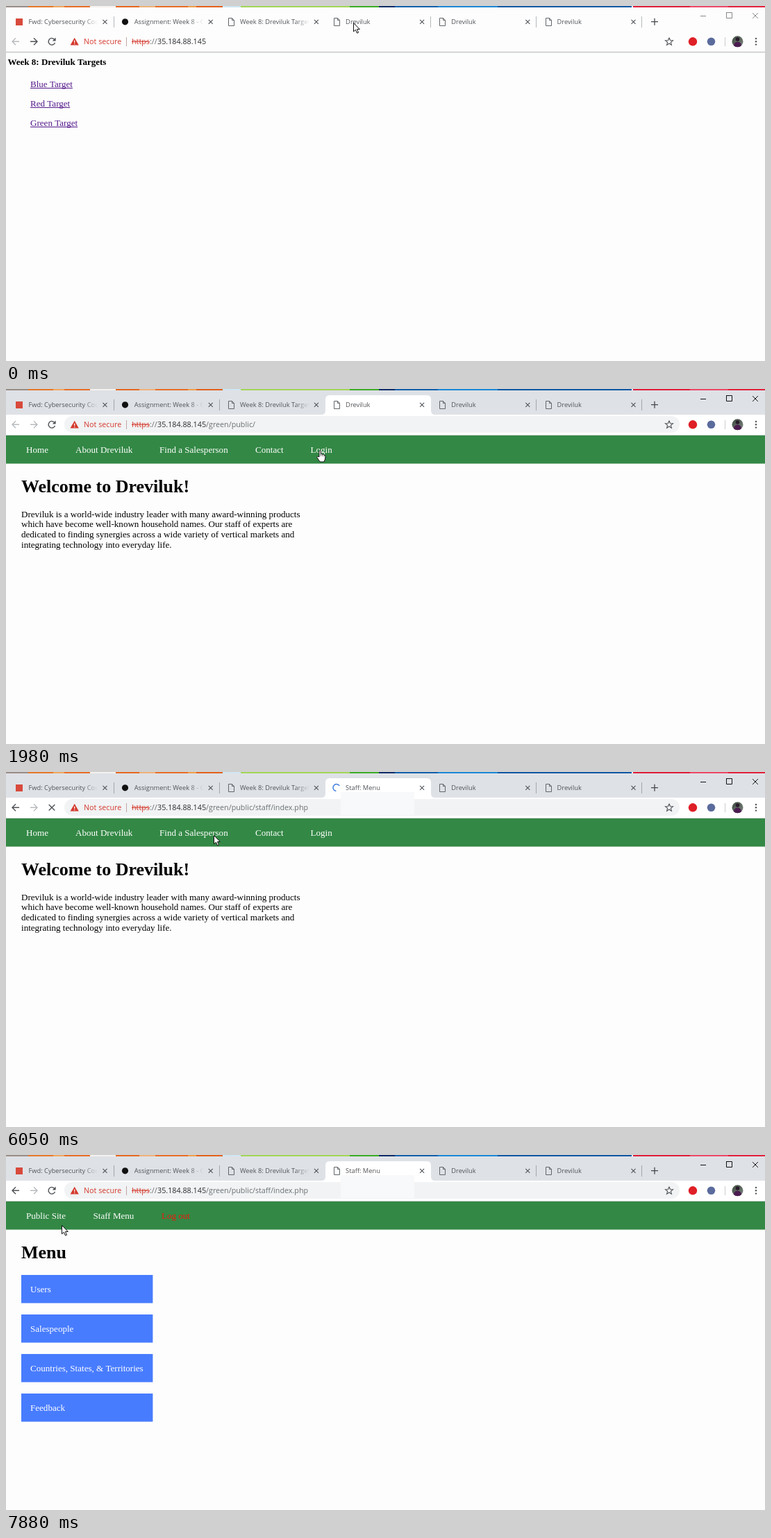
An HTML page with a canvas for the animation above (8000 ms loop, 1093 by 512 pixels).

```html
<!DOCTYPE html>
<html lang="en">
<head>
<meta charset="utf-8">
<title>Browser session</title>
<style>
html, body { margin: 0; width: 100%; height: 100%; overflow: hidden; background: #fdfdfd; }
canvas { display: block; }
</style>
</head>
<body>
<canvas id="stage" width="1093" height="512"></canvas>
<script>
const ctx = document.getElementById('stage').getContext('2d');
const LOOP = 8000;
const BRAND = 'Dreviluk';
const SERIF = '"Liberation Serif", serif';
const BODY = '13.07px ' + SERIF;
const BOLD = 'bold 13px ' + SERIF;
const HEAD = 'bold 26px ' + SERIF;
const TAB = '9.3px "Open Sans", sans-serif';
const URL_FONT = '10.75px "Open Sans", sans-serif';
const INK = '#505357', DIM = '#b8bbbf', RED = '#d4392d', PAPER = '#fdfdfd';

// Moments at which the state changes
const OPEN = 450, HOVER = 1550, UNHOVER = 1680, WAIT = 4810, COMMIT = 5780, DONE = 6190;

// [time, x, y, shape]
const POINTER = [
  [0, 500, 24, arrow], [980, 490, 31, arrow], [1110, 480, 38, arrow],
  [1550, 471, 42, beam], [1680, 464, 47, beam], [1820, 464, 66, arrow],
  [1980, 447, 88, hand], [4660, 451, 88, arrow], [5110, 418, 88, arrow],
  [5240, 352, 89, arrow], [5360, 302, 89, arrow], [5510, 295, 94, arrow],
  [5660, 294, 95, arrow], [6050, 299, 91, arrow], [7290, 231, 98, arrow],
  [7450, 157, 112, arrow], [7740, 130, 112, arrow], [7880, 80, 101, arrow]
];

function rect(x, y, w, h, color) {
  ctx.fillStyle = color;
  ctx.fillRect(x, y, w, h);
}

function disc(x, y, r, color) {
  ctx.fillStyle = color;
  ctx.beginPath();
  ctx.arc(x, y, r, 0, 7);
  ctx.fill();
}

function text(s, x, y, font, color) {
  ctx.font = font;
  ctx.fillStyle = color;
  ctx.fillText(s, x, y);
  return x + ctx.measureText(s).width;
}

// Each argument after the width is one polyline: [x, y, x, y, ...]
function lines(color, width, ...paths) {
  ctx.strokeStyle = color;
  ctx.lineWidth = width;
  ctx.beginPath();
  for (const p of paths) trace(p);
  ctx.stroke();
}

function trace(p) {
  ctx.moveTo(p[0], p[1]);
  for (let i = 2; i < p.length; i += 2) ctx.lineTo(p[i], p[i + 1]);
}

function cross(x, y, r, color, width) {
  lines(color, width, [x - r, y - r, x + r, y + r], [x + r, y - r, x - r, y + r]);
}

function outlined(x, y, path) {
  ctx.save();
  ctx.translate(x, y);
  ctx.beginPath();
  path();
  ctx.closePath();
  ctx.fillStyle = '#fff';
  ctx.strokeStyle = '#111';
  ctx.lineWidth = 1;
  ctx.lineJoin = 'round';
  ctx.fill();
  ctx.stroke();
  ctx.restore();
}

function arrow(x, y) {
  outlined(x + .5, y + .5, () =>
    trace([0, 0, 0, 12.4, 2.9, 9.8, 5, 14.6, 7, 13.8, 5, 9.1, 8.8, 9]));
}

function beam(x, y) {
  lines('#222', 1, [x + 3.5, y + 1, x + 3.5, y + 15],
    [x + 1, y + .5, x + 6, y + .5], [x + 1, y + 15.5, x + 6, y + 15.5]);
}

function hand(x, y) {
  outlined(x, y, () => {
    ctx.moveTo(4, 10);
    ctx.lineTo(4, 1.6);
    ctx.quadraticCurveTo(5.2, -.4, 6.4, 1.6);
    ctx.lineTo(6.4, 6);
    ctx.quadraticCurveTo(8, 4.8, 8.8, 6.6);
    ctx.quadraticCurveTo(10.3, 5.6, 11, 7.4);
    ctx.quadraticCurveTo(13, 6.8, 13, 9);
    ctx.lineTo(12.6, 13);
    ctx.lineTo(11, 17);
    ctx.lineTo(5, 17);
    ctx.lineTo(.8, 10.6);
    ctx.quadraticCurveTo(1.4, 8.2, 4, 10);
  });
  lines('#333', .7, [x + 6.4, y + 6, x + 6.4, y + 9], [x + 8.7, y + 6.6, x + 8.7, y + 9.2],
    [x + 11, y + 7.5, x + 11, y + 9.5]);
}

function desktopStrip() {
  const bands = [
    [0, '#9a8f88'], [32, '#e87a2c'], [68, '#f0a860'], [84, '#e8702a'], [121, '#f4f1ee'],
    [158, '#e66a24'], [192, '#efb27a'], [215, '#e8702a'], [262, '#f0a050'], [274, '#e2641f'],
    [312, '#cfe6f2'], [338, '#a4d65a'], [495, '#3fae2a'], [537, '#12306a'], [560, '#1763ad'],
    [622, '#1f8ad6'], [708, '#0f5aa6'], [901, '#ffffff'], [903, '#e0203c'], [985, '#ee4a6a'], [1040, '#e3243f']
  ];
  for (const [x, color] of bands) rect(x, 0, 1093 - x, 2, color);
}

function activeTab(x) {
  ctx.fillStyle = '#fff';
  ctx.beginPath();
  ctx.moveTo(x - 6, 37);
  ctx.quadraticCurveTo(x, 37, x, 31);
  ctx.lineTo(x, 15);
  ctx.quadraticCurveTo(x, 9, x + 6, 9);
  ctx.lineTo(x + 146, 9);
  ctx.quadraticCurveTo(x + 152, 9, x + 152, 15);
  ctx.lineTo(x + 152, 31);
  ctx.quadraticCurveTo(x + 152, 37, x + 158, 37);
  ctx.fill();
}

function tabTitle(s, x) {
  const fade = ctx.createLinearGradient(x + 108, 0, x + 129, 0);
  fade.addColorStop(0, INK);
  fade.addColorStop(1, 'rgba(80,83,87,0)');
  ctx.save();
  ctx.beginPath();
  ctx.rect(x + 20, 10, 109, 26);
  ctx.clip();
  text(s, x + 29, 26, TAB, fade);
  ctx.restore();
  cross(x + 139, 22.8, 3, INK, 1.1);
}

function docIcon(x) {
  lines('#62666a', 1, [x + 5.5, 17.5, x + .5, 17.5, x + .5, 28.5, x + 8.5, 28.5, x + 8.5, 20.5,
    x + 5.5, 17.5, x + 5.5, 20.5, x + 8.5, 20.5]);
}

function spinner(t) {
  const blue = t >= COMMIT;
  const turn = blue ? (t - 6050) / 1000 * 6 : -(t - WAIT) / 1000 * 4;
  const start = blue ? 1.7 : 2.6;
  ctx.strokeStyle = blue ? '#3f7fe0' : '#8a8d91';
  ctx.lineWidth = 1.5;
  ctx.beginPath();
  ctx.arc(476, 22.6, 5, start + turn, start + turn + (blue ? 4 : 1.6));
  ctx.stroke();
}

function tabs(t) {
  const focused = t >= OPEN;
  const loading = t >= WAIT && t < DONE;
  rect(0, 2, 1093, 35, focused ? '#dee1e6' : PAPER);
  if (focused) activeTab(460);
  const separators = focused ? [156, 308, 764, 916] : [156, 612, 764, 916];
  for (const x of separators) rect(x - 1, 15, 1, 16, focused ? '#a3a7ac' : '#b5b8bb');

  const titles = ['Fwd: Cybersecurity Course', 'Assignment: Week 8 - Course',
    `Week 8: ${BRAND} Targets`, t >= COMMIT ? 'Staff: Menu' : BRAND, BRAND, BRAND];
  titles.forEach((s, i) => {
    const x = 3.5 + i * 152.2;
    tabTitle(s, x);
    if (i > 1 && !(i === 3 && loading)) docIcon(Math.round(x + 12));
  });
  rect(14, 18, 10, 10, '#d84a3c');
  disc(171.5, 22.8, 4.6, '#111');
  if (loading) spinner(t);

  lines('#45484c', 1.3, [929, 22.7, 939, 22.7], [934, 17.7, 934, 27.7]);
  const c = focused ? '#111' : '#888';
  lines(c, 1, [1000, 14.5, 1008, 14.5], [1037.5, 9.5, 1045.5, 9.5, 1045.5, 17.5, 1037.5, 17.5, 1037.5, 9]);
  cross(1079, 14, 3.9, c, 1);
}

function navArrow(x, dir, color) {
  lines(color, 1.4, [x - 5 * dir, 51.3, x + 5 * dir, 51.3],
    [x, 46.3, x + 5 * dir, 51.3, x, 56.3]);
}

function reload() {
  ctx.strokeStyle = INK;
  ctx.lineWidth = 1.4;
  ctx.beginPath();
  ctx.arc(66, 51.3, 4.8, .35, 5.5);
  ctx.stroke();
  ctx.fillStyle = INK;
  ctx.beginPath();
  trace([71.6, 45.6, 71.6, 50.4, 66.8, 50.4]);
  ctx.fill();
}

function star(x, y) {
  const p = [];
  for (let i = 0; i <= 10; i++) {
    const r = i % 2 ? 2.5 : 5.8, a = i * Math.PI / 5 - Math.PI / 2;
    p.push(x + r * Math.cos(a), y + r * Math.sin(a));
  }
  lines(INK, 1.1, p);
}

function avatar() {
  ctx.save();
  ctx.beginPath();
  ctx.arc(1053.5, 51.3, 8, 0, 7);
  ctx.clip();
  const g = ctx.createLinearGradient(1046, 43, 1060, 59);
  g.addColorStop(0, '#3c4a3c');
  g.addColorStop(1, '#7c8580');
  rect(1045, 43, 17, 17, g);
  disc(1053.5, 48, 2.8, '#2a1c2c');
  disc(1053.5, 57, 5.5, '#4b1c50');
  ctx.restore();
}

function address(t) {
  ctx.fillStyle = RED;
  ctx.beginPath();
  trace([98.7, 45.8, 104.8, 56.6, 92.6, 56.6]);
  ctx.fill();
  rect(98.1, 49.6, 1.2, 3.4, '#fff');
  rect(98.1, 54, 1.2, 1.2, '#fff');
  text('Not secure', 112, 55.3, URL_FONT, RED);
  rect(173, 45, 1, 13, '#c2a5a3');
  const end = text('https', 181, 55.3, URL_FONT, RED);
  rect(181, 51, end - 181, 1, RED);
  text('://', end, 55.3, URL_FONT, '#6b6f73');
  const hostEnd = text('35.184.88.145', 218, 55.3, URL_FONT, '#2b2d30');
  const path = t >= COMMIT ? '/green/public/staff/index.php' : t >= OPEN ? '/green/public/' : '';
  text(path, hostEnd, 55.3, URL_FONT, '#6b6f73');
}

function toolbar(t) {
  const focused = t >= OPEN;
  rect(0, 37, 1093, 30, focused ? '#fff' : PAPER);
  if (focused) {
    ctx.fillStyle = t >= HOVER && t < UNHOVER ? '#e8eaed' : '#f1f3f4';
    ctx.beginPath();
    ctx.roundRect(84, 39, 886, 24, 12);
    ctx.fill();
  }
  rect(0, 66, 1093, 1, focused ? '#d2d5d4' : '#b4b6b8');
  if (t >= COMMIT) rect(482, 29, 106, 33, '#f8f9fa');

  navArrow(14, -1, t >= COMMIT ? INK : DIM);
  navArrow(40, 1, focused ? DIM : INK);
  if (t >= WAIT && t < DONE) cross(66, 51.3, 4.3, INK, 1.4);
  else reload();
  address(t);

  star(955, 51.5);
  disc(989, 51.3, 6.2, '#df1f26');
  disc(1015.5, 51.3, 5.8, '#5a6b9c');
  rect(1035, 45, 1, 13, '#c9ccd0');
  avatar();
  for (const y of [47, 51.3, 55.6]) disc(1080, y, 1.2, INK);
}

function targetsPage() {
  text(`Week 8: ${BRAND} Targets`, 2.5, 85, BOLD, '#000');
  ['Blue', 'Red', 'Green'].forEach((name, i) => {
    const y = 117 + i * 27.8;
    const end = text(name + ' Target', 35, y, BODY, '#551a8b');
    rect(35, Math.round(y + 1), end - 35, 1, '#551a8b');
  });
}

function navBar(items) {
  rect(0, 67, 1093, 40.6, '#338845');
  for (const [s, x, color] of items) text(s, x, 92.3, BODY, color || '#fff');
}

function welcomePage() {
  navBar([['Home', 29], ['About ' + BRAND, 100], ['Find a Salesperson', 221],
    ['Contact', 359], ['Login', 438.5]]);
  text(`Welcome to ${BRAND}!`, 22, 148.6, HEAD, '#000');
  [
    BRAND + ' is a world-wide industry leader with many award-winning products',
    'which have become well-known household names. Our staff of experts are',
    'dedicated to finding synergies across a wide variety of vertical markets and',
    'integrating technology into everyday life.'
  ].forEach((s, i) => text(s, 22, 184.6 + i * 14.67, BODY, '#000'));
}

function staffPage() {
  navBar([['Public Site', 29], ['Staff Menu', 125.5], ['Log out', 224, '#f0180c']]);
  text('Menu', 22, 148.6, HEAD, '#000');
  ['Users', 'Salespeople', 'Countries, States, & Territories', 'Feedback'].forEach((s, i) => {
    const y = 173 + i * 57;
    rect(22, y, 189.4, 40.6, '#487cff');
    text(s, 35, y + 24.6, BODY, '#fff');
  });
}

function draw(t) {
  rect(0, 0, 1093, 512, PAPER);
  if (t < OPEN) targetsPage();
  else if (t < DONE) welcomePage();
  else staffPage();
  tabs(t);
  toolbar(t);
  desktopStrip();
  const [, x, y, shape] = POINTER.findLast(p => p[0] <= t);
  shape(x, y);
}

const begin = performance.now();
function tick() {
  draw((performance.now() - begin) % LOOP);
  requestAnimationFrame(tick);
}
tick();
</script>
</body>
</html>
```
